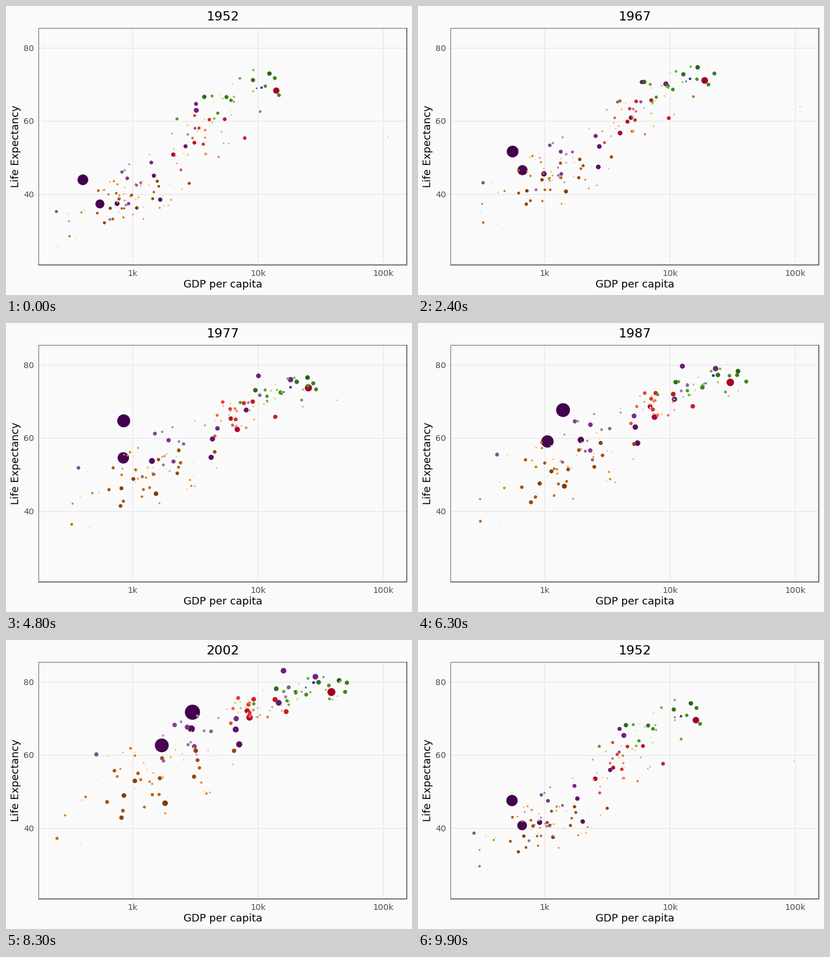
A matplotlib script that plays this animation: 700x500 px, repeating every 10 s.

```python
import numpy as np
import matplotlib.pyplot as plt
from matplotlib.animation import FuncAnimation
from matplotlib.colors import LinearSegmentedColormap

W, H, DPI = 700, 500, 100
PT = 72 / DPI
BG, GRID, EDGE, TICK = "#FAFAFA", "#EBEBEB", "#666666", "#4D4D4D"
N = 12                                    # years from 1952 to 2007, five apart
STEPS = [8] + [9] * 4 + [8] * 7           # frames spent moving to the next year
STARTS = np.concatenate([[0], np.cumsum(STEPS)])
plt.rcParams["font.family"] = "DejaVu Sans"
rng = np.random.default_rng(4)

# Most prominent dots: populations in millions, then (state, GDP, life) key points
LEADERS = {
    "asia": [
        (556, 1319, [(0, 400, 44), (1, 576, 50.5), (2, 488, 44.5), (4, 677, 63.1),
                     (5, 741, 64), (8, 1656, 68.7), (10, 3119, 72), (11, 4959, 73)]),
        (372, 1110, [(0, 547, 37.4), (4, 724, 50.7), (7, 977, 58.6),
                     (10, 1747, 62.9), (11, 2452, 64.7)]),
        (86, 127, [(0, 3217, 63), (4, 14779, 73.4), (7, 22376, 78.7), (11, 31656, 82.6)]),
        (82, 224, [(0, 750, 37.5), (4, 1111, 49.2), (11, 3541, 70.7)]),
        (.16, 2.5, [(0, 108382, 55.6), (4, 109348, 67.7), (6, 31354, 71.3),
                    (11, 47307, 77.6)]),
    ],
    "africa": [
        (33, 135, [(0, 1077, 36.3), (4, 1698, 42.8), (7, 1385, 46.9), (11, 2014, 46.9)]),
    ],
    "americas": [
        (158, 301, [(0, 13990, 68.4), (5, 24073, 73.4), (11, 42952, 78.2)]),
        (57, 190, [(0, 2109, 50.9), (5, 6660, 61.5), (11, 9066, 72.4)]),
    ],
}

# Everyone else follows a continent trend: (mean, spread) at the start, middle and end
CROWDS = {
    "africa": dict(
        n=51, pops=(80, .2), growth=3.6,
        gdp=[(2.97, .25), (3.13, .3), (3.18, .39)],
        life=[(39, 4.8), (50, 6), (54.5, 8)],
        ramp=["#7F3B08", "#B35806", "#E08214", "#FDB863", "#FEE0B6"]),
    "americas": dict(
        n=23, pops=(109, 1), growth=2.8,
        gdp=[(3.5, .2), (3.76, .2), (3.9, .22)],
        life=[(53.5, 7.5), (65, 5), (73.5, 3)],
        ramp=["#A50026", "#D73027", "#F46D43", "#FDAE61", "#FEE090"]),
    "asia": dict(
        n=28, pops=(169, .7), growth=3,
        gdp=[(3.08, .33), (3.45, .45), (3.7, .48)],
        life=[(46, 8), (61.5, 7), (70.5, 6)],
        ramp=["#40004B", "#762A83", "#9970AB", "#C2A5CF", "#E7D4E8"]),
    "europe": dict(
        n=30, pops=(82, .3), growth=1.35,
        gdp=[(3.72, .22), (4.12, .18), (4.33, .22)],
        life=[(65, 4.5), (72.4, 2), (77.7, 2.6)],
        ramp=["#276419", "#4D9221", "#7FBC41", "#B8E186", "#E6F5D0"]),
    "oceania": dict(
        n=2, pops=(20, 4), growth=2.2,
        gdp=[(4.01, .01), (4.24, .02), (4.47, .06)],
        life=[(69.2, .2), (73.3, .6), (80.7, .5)],
        ramp=["#313695", "#4575B4"]),
}


def px(log_gdp):
    return 218.5 + 216 * (log_gdp - 3)


def py(life):
    return 326 - 6.325 * (life - 40)


def radius(pop):
    return 1.1 + 12.5 * np.sqrt(pop / 1319)


def track(keys, values):
    return np.interp(np.arange(N), keys, values)


def dot(first, last, log_gdp, life):
    return px(log_gdp), py(life), radius(np.geomspace(first, last, N))


def leader(first, last, keys):
    at, gdp, life = np.transpose(keys)
    return dot(first, last, track(at, np.log10(gdp)), track(at, life))


def trend(bands, z):
    mean, spread = np.transpose(bands)
    return track([0, (N - 1) / 2, N - 1], mean + spread * z)


def wander(size):
    """Yearly noise that keeps neighbours from moving in step."""
    return np.convolve(rng.normal(0, size, N + 2), [.25, .5, .25], "valid")


def crowd(n, pops, growth, gdp, life):
    top, small = pops
    for u in np.linspace(0, 1, n):
        last = top * (small / top) ** (u ** 1.4)
        z, w = np.clip(rng.normal(size=2), -2, 2)
        yield dot(last / growth, last, trend(gdp, z) + wander(.04),
                  trend(life, .7 * z + .7 * w) + wander(.6))


rows, colors = [], []
for name, spec in CROWDS.items():
    ramp = LinearSegmentedColormap.from_list(name, spec.pop("ramp"))
    group = [leader(*d) for d in LEADERS.get(name, [])] + list(crowd(**spec))
    group.sort(key=lambda d: -d[2][-1])
    rows += group
    colors += [ramp(t) for t in np.linspace(0, 1, len(group))]

data = np.array(rows)
order = np.argsort(-data[:, 2, -1])       # large dots go underneath
data, colors = data[order], np.array(colors)[order]
data = np.concatenate([data, data[:, :, :1]], axis=2)   # back to the first year

fig = plt.figure(figsize=(W / DPI, H / DPI), dpi=DPI, facecolor=BG)
ax = fig.add_axes([0, 0, 1, 1])
ax.set(xlim=(0, W), ylim=(H, 0))
ax.axis("off")


def line(xs, ys, color, width, z):
    ax.plot(xs, ys, color=color, lw=width * PT, zorder=z,
            solid_capstyle="projecting", snap=False)


def text(x, y, s, size, color="black", ha="center", **kw):
    return ax.text(x, y, s, fontsize=size * PT, color=color, ha=ha,
                   va="baseline", **kw)


L, R, T, B = 56.5, 691, 38.5, 448
for k, label in enumerate(("1k", "10k", "100k")):
    x = px(3 + k)
    line((x, x), (T, B), GRID, 1.75, 1)
    text(x, 467, label, 14.4, TICK)
for v in (40, 60, 80):
    y = py(v)
    line((L, R), (y, y), GRID, 1.75, 1)
    text(48.3, y + 5, str(v), 14.4, TICK, "right")
line((L, L, R), (B, T, T), EDGE, 1, 4)
line((L, R, R), (B, B, T), EDGE, 1.8, 4)

text(373.5, 487, "GDP per capita", 18)
text(22, 243, "Life Expectancy", 18, rotation=90, rotation_mode="anchor")
title = text(374, 25, "1952", 22.3)
dots = ax.scatter(data[:, 0, 0], data[:, 1, 0], c=colors, linewidths=0, zorder=3)


def update(frame):
    i = np.searchsorted(STARTS, frame, side="right") - 1
    k, n = frame - STARTS[i], STEPS[i]
    x, y, r = (data[:, :, i] * (1 - k / n) + data[:, :, i + 1] * k / n).T
    dots.set_offsets(np.column_stack([x, y]))
    dots.set_sizes((2 * r * PT) ** 2)
    nearest = i if k <= (n + 1) // 2 else i + 1
    title.set_text(str(1952 + 5 * (nearest % N)))
    return dots, title


anim = FuncAnimation(fig, update, frames=100, interval=100, repeat=True,
                     repeat_delay=0, blit=False)
plt.show()
```
